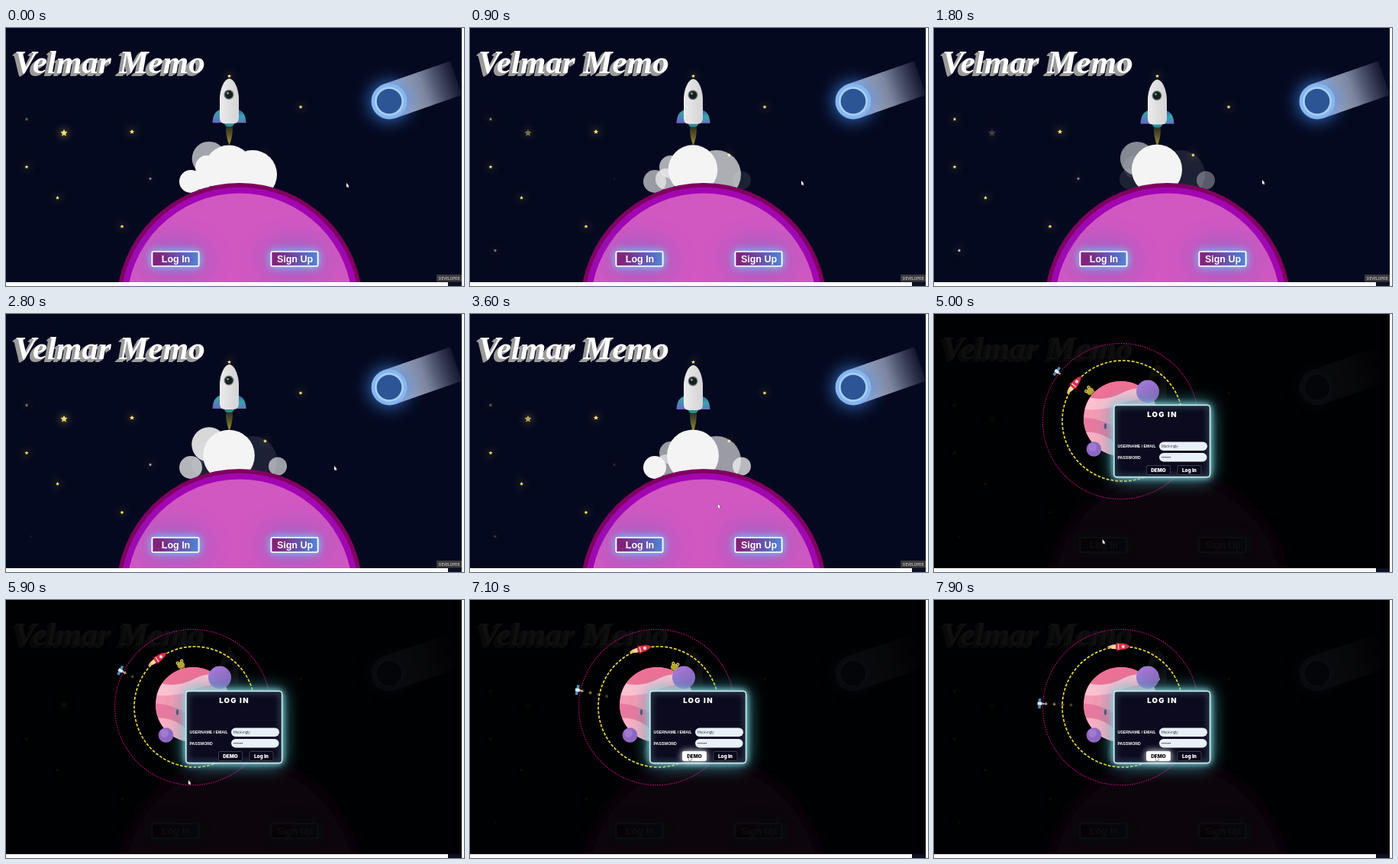
Recreate the animation shown at these times as an HTML page with a canvas. Size 600 by 338 pixels, loop 8000 ms.

```html
<!DOCTYPE html>
<html lang="en">
<head>
<meta charset="utf-8">
<title>Space login</title>
<style>
html, body { margin: 0; width: 100%; height: 100%; overflow: hidden; background: #fff; }
canvas { display: block; width: 600px; height: 338px; }
</style>
</head>
<body>
<canvas id="stage" width="600" height="338"></canvas>
<script>
const c = document.getElementById('stage').getContext('2d');
const LOOP = 8000, OPEN = 4900, TAU = Math.PI * 2, DEG = Math.PI / 180;
const ARIAL = '"Liberation Sans", Arial, sans-serif';
const HEAVY = 'Inter, "Liberation Sans", sans-serif';
const clamp = (v, lo = 0, hi = 1) => Math.min(hi, Math.max(lo, v));
const wave = (t, period, peak = 0) => .5 + .5 * Math.cos(TAU * (t / 1000 - peak) / period);

// Drawing helpers
function disc(x, y, r, fill, alpha = 1) {
  c.globalAlpha = alpha;
  c.fillStyle = fill;
  c.beginPath();
  c.arc(x, y, r, 0, TAU);
  c.fill();
  c.globalAlpha = 1;
}
function oval(x, y, rx, ry, fill) {
  c.fillStyle = fill;
  c.beginPath();
  c.ellipse(x, y, rx, ry, 0, 0, TAU);
  c.fill();
}
function box(x, y, w, h, fill) {
  c.fillStyle = fill;
  c.fillRect(x, y, w, h);
}
function shape(d, fill) {
  c.fillStyle = fill;
  c.fill(new Path2D(d));
}
function pill(x, y, w, h, r, fill, line, width = 1) {
  c.beginPath();
  c.roundRect(x, y, w, h, r);
  c.fillStyle = fill;
  c.fill();
  if (!line) return;
  c.strokeStyle = line;
  c.lineWidth = width;
  c.stroke();
}
function text(s, x, y, font, fill, align = 'left', spacing = 0) {
  c.font = font;
  c.fillStyle = fill;
  c.textAlign = align;
  c.letterSpacing = spacing + 'px';
  c.fillText(s, x, y);
}
function blend(x1, y1, x2, y2, ...colors) {
  const g = c.createLinearGradient(x1, y1, x2, y2);
  colors.forEach((k, i) => g.addColorStop(i / (colors.length - 1), k));
  return g;
}
function glow(color, blur, draw) {
  c.save();
  c.shadowColor = color;
  c.shadowBlur = blur;
  draw();
  c.restore();
}
function at(x, y, angle, draw) {
  c.save();
  c.translate(x, y);
  c.rotate(angle);
  draw();
  c.restore();
}

// x, y, radius, lowest opacity, peak time of the twinkle
const stars = [
  [27, 119.5, 2.4, .35, 1.8], [76, 137.5, 4.8, .15, 0], [165, 136, 3.2, 1, 0],
  [27, 182, 2.6, 1, 0], [67.5, 222.5, 2.5, 1, 0], [152, 260, 2.6, 1, 0],
  [33, 291.5, 2.3, 0, 1.6], [189, 197.5, 2.2, .1, 2.4], [386, 103.5, 2.6, 1, 0],
  [292.5, 63, 2.6, 1, 0], [339.5, 166.5, 2.6, 1, 0]
];

function drawStar(t, [x, y, r, low, peak]) {
  c.globalAlpha = low + (1 - low) * wave(t, 3, peak);
  glow('#f2d750', 11, () => {
    c.fillStyle = r < 2.35 ? '#cfd1da' : '#f6df72';
    c.beginPath();
    for (let i = 0; i < 10; i++) {
      const a = i * Math.PI / 5, k = i % 2 ? r * .5 : r;
      c.lineTo(x + k * Math.sin(a), y - k * Math.cos(a));
    }
    c.fill();
  });
  c.globalAlpha = 1;
}

function drawTitle() {
  const font = 'italic bold 43px "Liberation Serif", Times, serif';
  for (let i = 5; i > 0; i--) text('Velmar Memo', 11 - i, 59 + i * .8, font, '#9b9b9b');
  text('Velmar Memo', 11, 59, font, '#fff');
}

function drawComet() {
  at(502, 96, -19.2 * DEG, () =>
    box(0, -23.5, 93, 47, blend(0, 0, 96, 0, '#b4bfd8', 'rgba(165,174,200,.75)', 'rgba(140,150,180,.06)')));
  glow('#3f86e8', 24, () => disc(502, 96, 23.5, '#86b6f0'));
  disc(502, 96, 19, '#a9cff6');
  disc(502, 96, 16.3, '#2b5595');
}

function drawShip(t) {
  c.save();
  c.translate(0, wave(t, 2.6, 1.6) * 1.6);
  shape('M288 127H297Q297.500 142 292.500 153Q287.500 142 288 127Z',
    blend(0, 127, 0, 153, '#25281f', '#5c5829', '#a2942f'));
  shape('M286 124H299Q299 129 292.500 129T286 124Z', '#2a8f98');
  shape('M283 106Q271 108 270.500 124H284Z', blend(278, 107, 274, 124, '#3aa6ac', '#4a8bb4', '#6b62c6'));
  shape('M302 106Q314 108 314.500 124H301Z', blend(305, 107, 309, 124, '#3b5fa0', '#35a5ab', '#6477c0'));
  shape('M292.500 66C299 66 305 80 305 93V117Q305 125 298 125H287Q280 125 280 117V93C280 80 286 66 292.500 66Z',
    blend(280, 0, 305, 0, '#ececee', '#dededf', '#d4d4d8'));
  disc(292, 87, 6.5, '#77797c');
  disc(292, 87, 5.2, '#14211f');
  disc(290.5, 85.3, 1.4, '#7aa9a2');
  c.restore();
}

function drawClouds(t) {
  const white = '#f4f4f4';
  const puff = clamp(wave(t, 4.6) * 1.2 - .1, .1, 1);
  const back = clamp(1.3 * wave(t, 3, 2.45) - .25);
  disc(266, 171, 21 + 2 * back, white, back);
  disc(242, 201, 15, white, clamp(1.25 * wave(t, 3.6)));
  disc(356, 199.5, 12, white, .75 * (1 - wave(t, 7.5)));
  disc(323, 192, 32, white, puff);
  disc(263, 182, 15, white, puff);
  disc(257, 198, 14, white, puff);
  disc(292, 185.5, 34 - 2 * wave(t, 7), white);
}

function drawButton(label, x, hover) {
  const fill = blend(x, 0, x + 61, 0, '#8b005f', '#6f3fa0', '#4f78cc');
  const plate = () => pill(x, 293, 61, 19, 1.5, fill, '#fff', hover ? 2.5 : 1.7);
  if (!hover) {
    glow('rgba(75,110,205,.9)', 42, plate);
    glow('#65dcff', 11, plate);
  } else glow('#fff', 4, plate);
  text(label, x + 31, 307, 'bold 12.5px ' + ARIAL, hover ? '#150d22' : '#fff', 'center');
}

function drawHome(t) {
  box(0, 0, 597, 333, '#05091f');
  stars.forEach(s => drawStar(t, s));
  drawTitle();
  drawComet();
  drawShip(t);
  drawClouds(t);
  disc(306, 364.5, 161.5, '#80005f');
  disc(306, 364.5, 156, '#a106b2');
  disc(306, 364.5, 148, '#d158c1');
  drawButton('Log In', 191.5, t > 3950 && t < OPEN);
  drawButton('Sign Up', 347.5, false);
}

function orbit(x, y, r, color, width, dash, turn) {
  c.strokeStyle = color;
  c.lineWidth = width;
  c.setLineDash(dash);
  c.beginPath();
  c.arc(x, y, r, turn, turn + TAU);
  c.stroke();
  c.setLineDash([]);
}

function drawWorld() {
  c.save();
  c.beginPath();
  c.arc(245, 137, 49, 0, TAU);
  c.clip();
  box(195, 87, 100, 100, '#f59ab5');
  shape('M190 80H300V112Q270 96 245 108T190 116Z', '#ef7095');
  shape('M190 104Q218 118 245 104T300 103V111Q268 108 245 118T190 124Z', '#fbc0d0');
  shape('M190 136Q214 134 240 150T300 160V195H190Z', '#e8799f');
  shape('M190 156Q218 150 240 172T300 180V195H190Z', '#f9aec3');
  c.restore();
  oval(224.5, 147, 1.6, 3.8, '#50436f');
}

function drawAlien() {
  oval(0, 0, 5, 4.5, '#b6a331');
  disc(-3.5, -4, 2.2, '#d8c94a');
  disc(2.5, -5, 2.2, '#d8c94a');
  disc(-3.5, -4, .9, '#342e1c');
  disc(2.5, -5, .9, '#342e1c');
  box(-3, 3, 2, 3, '#8b7425');
  box(2, 3, 2, 3, '#8b7425');
}

function drawMiniShip() {
  shape('M-6 -3Q-14 -3 -18 0Q-13 3 -6 3Z', blend(-18, 0, -6, 0, '#e9a33e', '#fff3cf'));
  shape('M-6 -6L2 -3V3L-6 6L-4 0Z', '#a91c35');
  shape('M-7 -3.500Q5 -6 12 0Q5 6 -7 3.500Z', '#dc3047');
  disc(3, 0, 2, '#f5dfe1');
  box(-4, -3.5, 1.5, 7, '#f0c9c7');
}

function drawSatellite(t) {
  for (let i = 0; i < 4; i++) {
    const x = 6 + 11 * i + wave(t, 1.6) * 2;
    c.globalAlpha = clamp((t - 5100 - i * 500) / 500) * (.9 - i * .16);
    at(x, 0, 45 * DEG, () => box(-1.6, -1.6, 3.2, 3.2, '#c49a55'));
  }
  c.globalAlpha = 1;
  box(-2, -6.5, 3.5, 4.5, '#4c91bd');
  box(-2, 2, 3.5, 4.5, '#4c91bd');
  box(-3, -2, 6, 4, '#e6edf0');
  box(3, -1, 3, 2, '#a8b5bc');
}

function drawOrbits(t) {
  const s = (t - 5900) / 1000;
  const ship = (-126 + 17.2 * s) * DEG;
  const sat = (207 - 12.2 * s) * DEG;
  const walk = (-107 + 35 * s) * DEG;
  orbit(244.5, 140.5, 102, '#ad0877', 1.2, [1.7, 1.4], sat);
  orbit(247, 140, 79, '#e9d83f', 1.7, [3.8, 2.1], ship);
  at(245 + 54 * Math.cos(walk), 137 + 54 * Math.sin(walk), walk + 90 * DEG, drawAlien);
  drawWorld();
  const moon = blend(270, 90, 290, 115, '#a17bd4', '#8a60bd');
  disc(280, 101.5, 15, moon);
  disc(209.5, 177, 9.8, '#9066c4');
  disc(207.5, 174.5, 5.5, '#9f7ad0');
  at(247 + 79 * Math.cos(ship), 140 + 79 * Math.sin(ship), ship + 90 * DEG, drawMiniShip);
  at(244.5 + 106 * Math.cos(sat), 140.5 + 106 * Math.sin(sat), sat + 180 * DEG, () => drawSatellite(t));
}

function formButton(label, x, hover) {
  const plate = () => pill(x, 198.5, 31, 12, 1.5, hover ? '#fff' : '#08081a', hover ? '#fff' : '#4a4a58', .8);
  if (hover) glow('#fff', 8, plate);
  else plate();
  text(label, x + 15.5, 207, '900 6.4px ' + HEAVY, hover ? '#11111c' : '#fff', 'center');
}

function drawForm(t) {
  const panel = () => pill(236, 119.5, 125.5, 94, 3.5, '#0b0a1e', '#c8e9ee', 1.5);
  glow('#43aab5', 24, panel);
  glow('#9feaf2', 9, panel);
  text('LOG IN', 299, 134.5, '900 9.6px ' + HEAVY, '#fff', 'center', 1.3);
  const label = 'bold 5.2px ' + ARIAL;
  text('USERNAME / EMAIL', 240.5, 175, label, '#fff');
  text('PASSWORD', 240.5, 189.5, label, '#fff');
  pill(295, 167.5, 63, 11.5, 5.7, '#e8f0fb');
  pill(295, 182, 62.5, 11.5, 5.7, '#e8f0fb');
  text('Mock-ingly', 298, 175, '4.5px ' + ARIAL, '#3a3a42');
  for (let i = 0; i < 8; i++) disc(298.7 + i * 1.55, 187.7, .62, '#30303a');
  formButton('DEMO', 278.5, t > 6650);
  formButton('Log In', 319, false);
}

// time, x, y
const path = [
  [0, 446, 204], [500, 446, 204], [1100, 430, 200], [3100, 430, 200], [4100, 220, 299],
  [4900, 220, 299], [5700, 239, 237], [5950, 239, 237], [6750, 287, 206],
  [7200, 287, 206], [7600, 291, 206], [8000, 291, 206]
];
function drawCursor(t) {
  const i = path.findIndex(p => p[0] > t);
  const [a, b] = [path[i - 1], path[i]];
  const k = (t - a[0]) / (b[0] - a[0]), e = k * k * (3 - 2 * k);
  at(a[1] + (b[1] - a[1]) * e, a[2] + (b[2] - a[2]) * e, 0, () => {
    const arrow = new Path2D('M0 -1V4.500L1.100 3.600L2 5.300L2.900 4.800L2.100 3.200H3.500Z');
    c.strokeStyle = '#333';
    c.lineWidth = .7;
    c.stroke(arrow);
    c.fillStyle = '#fff';
    c.fill(arrow);
  });
}

function frame(now) {
  const t = now % LOOP;
  c.clearRect(0, 0, 600, 338);
  c.save();
  c.beginPath();
  c.rect(0, 0, 597, 333);
  c.clip();
  drawHome(t);
  if (t >= OPEN) {
    box(0, 0, 597, 333, 'rgba(0,0,0,.94)');
    drawOrbits(t);
    drawForm(t);
  }
  c.restore();
  box(0, 333, 600, 5, '#fff');
  box(597, 0, 3, 338, '#fff');
  box(579, 333, 18, 5, '#0b1022');
  if (t < OPEN) {
    pill(564, 323, 33, 9.5, 1, '#3b3b3d');
    text('DEVELOPER', 580.5, 329.6, '5px "Open Sans", sans-serif', '#eee', 'center');
  }
  drawCursor(t);
  requestAnimationFrame(frame);
}
requestAnimationFrame(frame);
</script>
</body>
</html>
```
